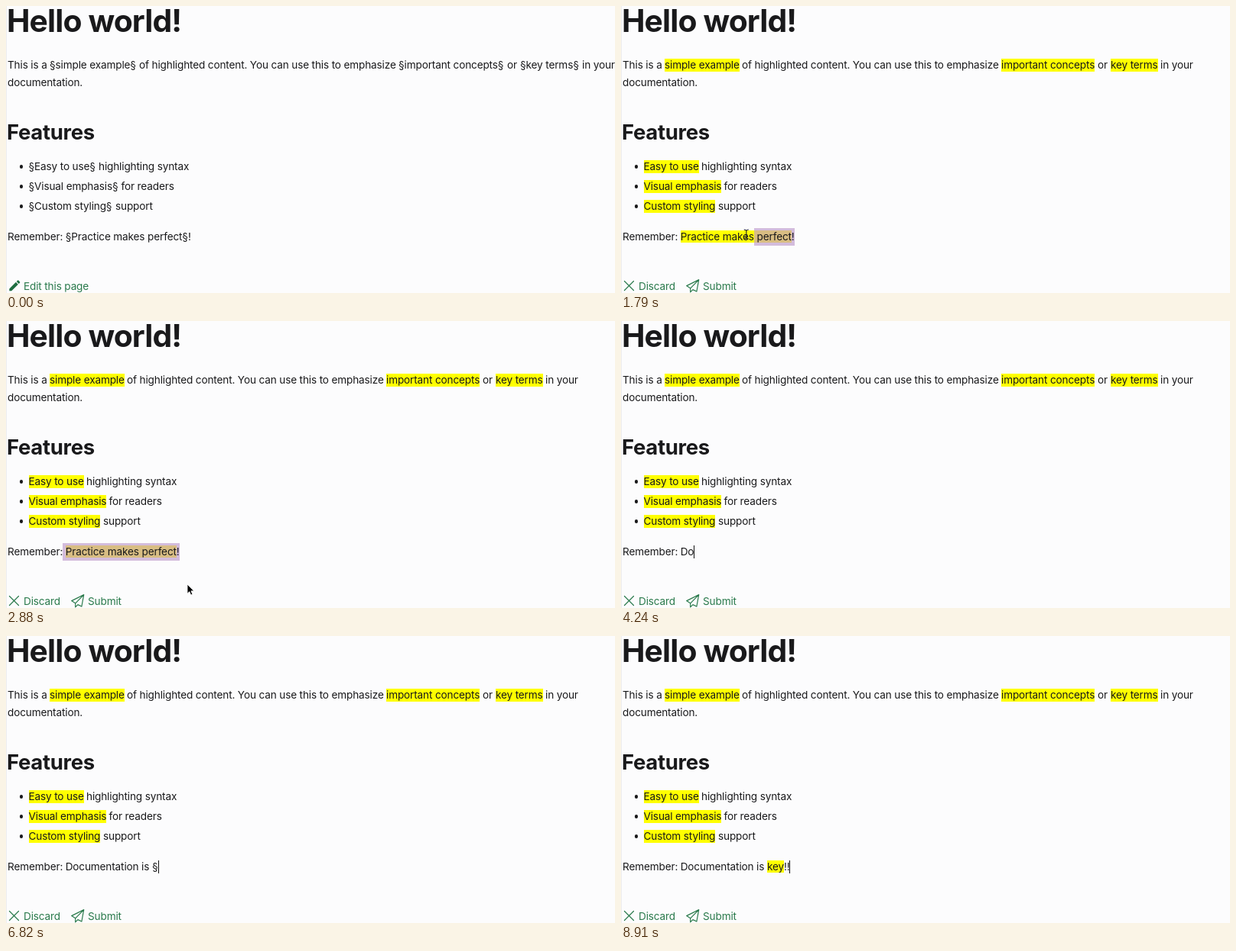
Write an HTML page that moves like this. It is 796x376 px and loops after 8.94 s.

```html
<!DOCTYPE html>
<html lang="en">
<head>
<meta charset="utf-8">
<title>Highlight editing</title>
<style>
html, body { margin: 0; width: 100%; height: 100%; overflow: hidden; background: #fcfcfd; }
#stage {
  position: relative; width: 796px; height: 376px; overflow: hidden;
  background: #fcfcfd; box-shadow: inset 1px 0 #ededef; color: #19191b;
  font: 13.6px/23px Inter, "Open Sans", sans-serif; letter-spacing: -.15px;
}
#stage > *, .bar > * { position: absolute; margin: 0; white-space: pre; }
h1, h2 { left: 1px; font-weight: 700; }
h1 { top: -6px; font-size: 40.8px; line-height: 50px; letter-spacing: -.021em; }
h2 { top: 148px; font-size: 27.5px; line-height: 34px; letter-spacing: -.012em; }
.hl { background: #ff0; }
.sel { background: #d3bcdc; padding: 3px 0 4px; }
.sel .hl { background: #d8bd83; }
.caret { display: inline-block; width: 1px; height: 17px; margin-right: -1px; vertical-align: -4px; background: #111; }
.dot { left: 18px; width: 4.4px; height: 4.4px; border-radius: 50%; background: #19191b; }
.bar { left: 0; top: 356px; color: #2a7a4c; }
.bar > span { top: 0; }
svg { overflow: visible; }
.line { fill: none; stroke: #2a7a4c; stroke-width: 1.2; stroke-linejoin: round; stroke-linecap: round; }
</style>
</head>
<body>
<div id="stage">
  <h1>Hello world!</h1>
  <h2>Features</h2>
  <div class="bar" id="view">
    <svg style="left:1.7px;top:1.4px" width="18.7" height="18.7" viewBox="0 0 24 24" fill="#1f6e41"><path d="M3 17.25V21h3.75L17.81 9.94l-3.75-3.75zM20.71 7.04c.39-.39.39-1.02 0-1.41l-2.34-2.34a1 1 0 0 0-1.41 0l-1.83 1.83 3.75 3.75z"/></svg>
    <span style="left:23px">Edit this page</span>
  </div>
  <div class="bar" id="edit">
    <svg class="line" width="110" height="20" style="left:0;top:0">
      <path d="M4.5 4.5l12 12m0-12l-12 12"/>
      <path d="M101.7 2.6L85.7 10.6l5 3.2v5l3.2-3.2 5 2.4zL90.7 13.8"/>
    </svg>
    <span style="left:23px">Discard</span>
    <span style="left:107px">Submit</span>
  </div>
  <span id="tail" style="left:74px;top:291px"></span>
  <svg id="arrow" width="12" height="18" style="left:0;top:0"><path d="M0 0v12.2l2.8-2.6 1.9 4.3 2.1-.9-1.9-4.2h3.8z" fill="#000" stroke="#fff" stroke-width=".8"/></svg>
  <svg id="beam" width="8" height="14" style="left:0;top:0"><path d="M-3-6Q0-6 0-4Q0-6 3-6M0-4V4M-3 6Q0 6 0 4Q0 6 3 6M-1.5 1h3" fill="none" stroke="#222" stroke-width="1.1"/></svg>
</div>
<script>
const LOOP = 8940, RENDERED = 940, FOCUS = 970, EDITING = 1030, TYPING = 3700;
const MARK_SHIFT = 16; // room taken by a pair of § signs
const $ = id => document.getElementById(id);
const stage = $("stage"), tail = $("tail");

// rows of [text, x]; every second piece is highlighted
const rows = [
  [66, ["This is a", 2], ["simple example", 57],
    ["of highlighted content. You can use this to emphasize", 158],
    ["important concepts", 497], ["or", 623], ["key terms", 640], ["in your", 705]],
  [89, ["documentation.", 2]],
  [199, ["", 0], ["Easy to use", 29.5], ["highlighting syntax", 105]],
  [225, ["", 0], ["Visual emphasis", 29.5], ["for readers", 134.5]],
  [251, ["", 0], ["Custom styling", 29.5], ["support", 127]],
  [291, ["Remember:", 2]]
];
const pieces = [];
for (const [top, ...row] of rows) {
  row.forEach(([text, x], i) => {
    const el = document.createElement("span");
    el.style.top = top + "px";
    stage.insertBefore(el, tail);
    pieces.push({ el, text, x, marked: i % 2 === 1, shift: MARK_SHIFT * (i >> 1) });
  });
  if (row[0][0] === "") {
    const dot = document.createElement("i");
    dot.className = "dot";
    dot.style.top = top + 9.4 + "px";
    stage.insertBefore(dot, tail);
  }
}

const pointer = [[300, 300, 382], [880, 267, 314], [1300, 267, 314], [1420, 230, 305],
  [1790, 164, 299], [2250, 72, 301], [2450, 72, 301], [2850, 237, 345], [TYPING, 237, 345]];
const selection = [[1420, 24], [1775, 15], [2250, 0]];
const typed = [[TYPING, 1], [3900, 2], [4130, 3], [6750, 19], [8550, 25]];

function at(steps, t, k = 1) {
  if (t <= steps[0][0]) return steps[0][k];
  for (let i = 1; i < steps.length; i++) {
    const a = steps[i - 1], b = steps[i];
    if (t < b[0]) return a[k] + (b[k] - a[k]) * (t - a[0]) / (b[0] - a[0]);
  }
  return steps[steps.length - 1][k];
}

const hl = s => s && `<span class="hl">${s}</span>`;
const caret = '<i class="caret"></i>';

// " Practice makes perfect!" with the phrase highlighted, cut to a range
function phrase(from, to) {
  const s = " Practice makes perfect!";
  const cut = (a, b) => s.slice(Math.max(a, from), Math.max(Math.min(b, to), Math.max(a, from)));
  return cut(0, 1) + hl(cut(1, 23)) + cut(23, 24);
}

function tailHtml(t) {
  if (t < RENDERED) return " §Practice makes perfect§!";
  if (t < TYPING) {
    const start = Math.ceil(at(selection, t));
    if (start === 24) return phrase(0, 24) + (t >= FOCUS ? caret : "");
    return phrase(0, start) + `<span class="sel">${phrase(start, 24)}</span>`;
  }
  const text = " Documentation is §key§!!".slice(0, Math.floor(at(typed, t) + 1e-6));
  return text.replace(/§(.+)§/, (_, word) => hl(word)) + caret;
}

let lastTail, lastMode;
function draw(t) {
  const rendered = t >= RENDERED;
  if (rendered !== lastMode) {
    lastMode = rendered;
    for (const p of pieces) {
      p.el.textContent = p.marked && !rendered ? `§${p.text}§` : p.text;
      p.el.className = p.marked && rendered ? "hl" : "";
      // keep the highlight as tall as the glyph box
      p.el.style.lineHeight = p.marked ? "17px" : "";
      p.el.style.marginTop = p.marked ? "3px" : "";
      p.el.style.left = p.x + (rendered ? 0 : p.shift) + "px";
    }
  }
  const html = tailHtml(t);
  if (html !== lastTail) tail.innerHTML = lastTail = html;

  $("view").style.display = t < EDITING ? "" : "none";
  $("edit").style.display = t < EDITING ? "none" : "";

  const x = at(pointer, t), y = at(pointer, t, 2);
  const shown = t >= 300 && t < TYPING;
  const arrow = y > 330;
  for (const [id, on] of [["arrow", arrow], ["beam", !arrow]]) {
    $(id).style.display = shown && on ? "" : "none";
    $(id).style.transform = `translate(${x}px, ${y}px)`;
  }
}

const begin = performance.now();
function tick() {
  draw((performance.now() - begin) % LOOP);
  requestAnimationFrame(tick);
}
tick();
</script>
</body>
</html>
```
